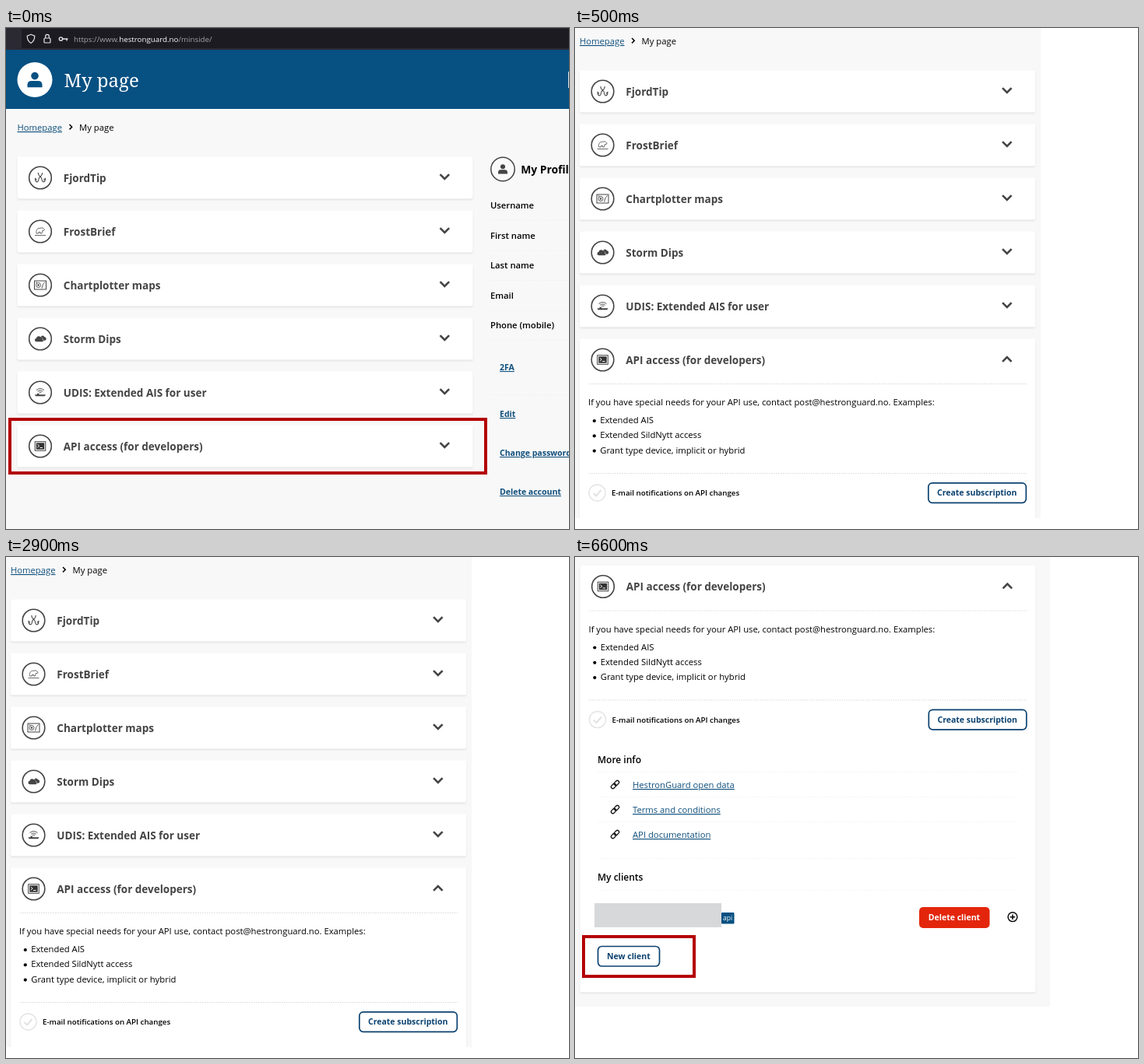
Recreate the animation shown at these times as an HTML page. Size 723 by 644 pixels, loop 8000 ms.

```html
<!DOCTYPE html>
<html lang="en">
<head>
<meta charset="utf-8">
<title>My page</title>
<style>
html, body { margin: 0; width: 100%; height: 100%; overflow: hidden; background: #fff; }
svg { display: block; width: 723px; height: 644px; font-family: "Open Sans", sans-serif; }
text { white-space: pre; }
</style>
</head>
<body>
<svg id="stage" viewBox="0 0 723 644"></svg>
<script>
const LOOP = 8000;
const INK = '#000', GREY = '#444', BLUE = '#075082', NAVY = '#0b4270', RED = '#b30306';

const text = (x, y, s, size = 11.25, weight = 400, fill = INK, more = '') =>
  `<text x="${x}" y="${y}" font-size="${size}" font-weight="${weight}" fill="${fill}" ${more}>${s}</text>`;
const link = (x, y, s, size, weight) => text(x, y, s, size, weight, '#0f4f7c', 'text-decoration="underline"');
const rect = (x, y, w, h, fill, more = '') =>
  `<rect x="${x}" y="${y}" width="${w}" height="${h}" fill="${fill}" ${more}/>`;
const circle = (x, y, r, fill, more = '') => `<circle cx="${x}" cy="${y}" r="${r}" fill="${fill}" ${more}/>`;
const line = (d, stroke = GREY, width = 1, more = '') =>
  `<path d="${d}" fill="none" stroke="${stroke}" stroke-width="${width}" ${more}/>`;
const shape = (d, fill = GREY) => `<path d="${d}" fill="${fill}"/>`;
const move = (x, y, s, k = 1) => `<g transform="translate(${x} ${y}) scale(${k})">${s}</g>`;
const dots = (x1, x2, y, c = '#d9d9d9') => line(`M${x1} ${y}H${x2}`, c, 1, 'stroke-dasharray="1.6 1.4"');
const frame = (x, y, w, h) => rect(x, y, w, h, 'none', `stroke="${RED}" stroke-width="4"`);
const outlined = (x, y, w, h, tx, s) =>
  rect(x, y, w, h, '#fff', `rx="5" stroke="${NAVY}" stroke-width="1.7"`) + text(tx, y + h / 2 + 3.8, s, 10.5, 700, NAVY);

const icons = {
  hooks: line('M-2.8-6.5Q-2.5-3.2 0-1.2 2-.2 2.2 3C2.8 6.6 6.6 6.2 6.4 1L4.4 2.8' +
    'M2.8-6.5Q2.5-3.2 0-1.2-2-.2-2.2 3C-2.8 6.6-6.6 6.2-6.4 1L-4.4 2.8', GREY, 1.1),
  bear: line('M-5 2.5C-5.5-1-4-4.5-1-4.2L3-4.6 5.8-2.2 4.5-1 2.8-1 2 2.5H0V.8H-2V2.5ZM-7 5H7', GREY, .8),
  map: rect(-7.5, -5.5, 15, 11, 'none', `stroke="${GREY}" stroke-width="1"`) +
    circle(-2.5, 0, 3, 'none', `stroke="${GREY}" stroke-width=".9"`) + circle(-2.5, 0, 1.2, GREY) +
    line('M2 4L3.5-1 6-4M-6-3.5h2', GREY, .9),
  clouds: move(0, 0, shape('M-6 4.5A2.8 2.8 0 0 1-5.8-1 3.6 3.6 0 0 1 .3-2.8 2.8 2.8 0 0 1 3 .8 2 2 0 0 1 3.5 4.5Z') +
    shape('M1-3.2A3 3 0 0 1 6.3-2.6 2.6 2.6 0 0 1 6.4 2.6H4.7A3.2 3.2 0 0 0 3.2-.3 3.8 3.8 0 0 0 1-3.2Z'), .86),
  ship: line('M-5-3Q0-7 5-3M-3.3-1.3Q0-4 3.3-1.3M-1.5.2Q0-1 1.5.2', GREY, .9) +
    shape('M-7 2.8H-4V1.2H-1.5V2.8H7L5.8 4.8H-6Z'),
  terminal: rect(-6.8, -5.8, 13.6, 11.6, '#fff', `stroke="${GREY}" stroke-width="1"`) +
    rect(-5.2, -4.2, 10.4, 8.4, '#333') + line('M-3.6-2.3L-1.3-.3-3.6 1.7M-.4 2H3', '#fff', 1)
};

const sections = [
  ['hooks', 'FjordTip'], ['bear', 'FrostBrief'], ['map', 'Chartplotter maps'],
  ['clouds', 'Storm Dips'], ['ship', 'UDIS: Extended AIS for user'], ['terminal', 'API access (for developers)']
];

function card(i, height = 54, open = false) {
  const [icon, name] = sections[i], y = 54.5 + i * 69;
  return rect(6, y + 1.5, 585, height, '#e2e2e2', 'rx="2" filter="url(#soft)"') +
    rect(6, y, 585, height, '#fff', 'rx="2"') +
    circle(35.5, y + 27, 14.3, '#fff', `stroke="${GREY}" stroke-width="1.6"`) +
    move(35.5, y + 27, icons[icon]) +
    text(65.3, y + 32.4, name, 13.5, 700, GREY) +
    line(open ? `M549 ${y + 29.3}l5.8-5.8 5.8 5.8` : `M549 ${y + 22.7}l5.8 5.8 5.8-5.8`, GREY, 2.6);
}
const cards = n => sections.slice(0, n).map((_, i) => card(i)).join('');

const crumbs = link(6, 21, 'Homepage') + line('M73 13l3.2 3.2-3.2 3.2', INK, 1.5) + text(85.6, 21, 'My page');

const apiPanel = height => card(5, height, true) + dots(18, 580, 457.5) +
  text(17, 485, 'If you have special needs for your API use, contact post@hestronguard.no. Examples:') +
  ['Extended AIS', 'Extended SildNytt access', 'Grant type device, implicit or hybrid'].map((s, i) =>
    circle(24.8, 505 + i * 19.3, 2.1, INK) + text(32.2, 508 + i * 19.3, s)).join('') +
  dots(18, 580, 572.5) +
  circle(28.5, 597.5, 10.5, '#fff', 'stroke="#e4e4e4" stroke-width="1.4"') +
  line('M23.5 598l3.5 3.5 6.5-7.5', '#e2e2e2', 2) +
  text(47, 601, 'E-mail notifications on API changes', 9.75, 600) +
  outlined(453.8, 584.8, 125.5, 25.5, 465, 'Create subscription');

const person = (x, y, k, fill) => move(x, y,
  circle(0, -5.2, 4.8, fill) + shape('M-9.5 9.5V6.5Q-9.5 1.2-4.2 1.2H4.2Q9.5 1.2 9.5 6.5V9.5Z', fill), k);

function browserBar() {
  const c = '#e8e8ec';
  return rect(0, 0, 723, 28, '#2b2a33') + rect(20, 1, 703, 25, '#1c1b22') +
    line('M32 8.3l4.8 1.8c0 5-1.5 7.6-4.8 9.4-3.3-1.8-4.8-4.4-4.8-9.4Z', c, 1.2) +
    rect(49, 13, 8, 6, 'none', `rx="1" stroke="${c}" stroke-width="1.2"`) +
    line('M50.7 13v-2.3a2.3 2.3 0 0 1 4.6 0V13', c, 1.2) +
    circle(70.5, 14, 2.2, 'none', `stroke="${c}" stroke-width="1.3"`) + line('M72.7 14H79.5M78 14v2.4', c, 1.3) +
    text(87, 17.7, 'https://www.<tspan fill="#fbfbfe">hestronguard.no</tspan>/minside/', 9.75, 400, '#a3a2aa');
}

function profile() {
  const labels = ['Username', 'First name', 'Last name', 'Email', 'Phone (mobile)'];
  const links = [['2FA', 440], ['Edit', 500], ['Change password', 550], ['Delete account', 600]];
  return circle(638, 181.5, 15.2, '#fafafa', `stroke="${GREY}" stroke-width="1.5"`) +
    person(638, 181.5, .63, GREY) + text(661.3, 187, 'My Profile', 13.8, 700) +
    labels.map((s, i) => text(622, 232.3 + i * 38.5, s, 11.25, 600) +
      dots(622, 723, 247.5 + i * 38.5, '#f1f1f1')).join('') +
    dots(622, 723, 471.5, '#f1f1f1') +
    links.map(([s, y]) => link(634, y, s, 10.5, 700)).join('');
}

const overview = () => rect(0, 0, 723, 644, '#f8f8f8') + browserBar() +
  rect(0, 28, 723, 76, BLUE) + circle(37, 66.5, 22.5, '#fff') + person(37, 66.8, 1, BLUE) +
  text(74.5, 75.5, 'My page', 24, 500, '#fff', 'font-family="Noto Serif, serif"') +
  rect(722, 56, 1, 21, '#dfe8ef') +
  move(8.5, 111, crumbs + cards(6)) + profile() + frame(5, 503, 611, 69);

const expanded = () => rect(0, 0, 598, 630, '#f8f8f8') + crumbs + cards(5) +
  `<g clip-path="url(#fold)">${apiPanel(260)}</g>`;

function clients() {
  const links = ['HestronGuard open data', 'Terms and conditions', 'API documentation'];
  const ring = x => rect(x, -2.2, 7, 4.4, 'none', 'rx="2.2" stroke="#111" stroke-width="1.3"');
  const chain = `<g transform="rotate(-45)">${ring(-6.3)}${ring(-.7)}</g>`;
  return rect(0, 0, 610, 578, '#f8f8f8') + move(.5, -388.5, apiPanel(548.5)) +
    text(29, 265, 'More info', 12, 600) + text(29, 416, 'My clients', 12, 600) +
    [276.5, 308.5, 340.5, 387.5, 428.5].map(y => dots(29, 569, y, '#f3f3f3')).join('') +
    links.map((s, i) => move(51.5, 292.5 + i * 32, chain) + link(74, 297 + i * 32, s)).join('') +
    rect(25, 445, 163, 31, '#d7d8d9') + rect(188, 457, 16.5, 14.5, BLUE, 'rx="1"') +
    text(190, 467.3, 'api', 8.5, 400, '#fff') +
    rect(442, 450, 90.5, 27, '#e3260b', 'rx="5"') +
    text(487, 467.3, 'Delete client', 10.5, 700, '#fff', 'text-anchor="middle"') +
    circle(562, 462.7, 5.9, 'none', 'stroke="#111" stroke-width="1.5"') +
    line('M558.8 462.7h6.4M562 459.5v6.4', INK, 1.5) +
    outlined(29.5, 500.5, 79, 25.5, 41, 'New client') + frame(11, 488, 142, 51);
}

const scenes = [[0, overview], [500, expanded], [4500, clients]];
const stage = document.getElementById('stage');
stage.innerHTML = '<defs><filter id="soft"><feGaussianBlur stdDeviation="1"/></filter>' +
  '<clipPath id="fold"><rect width="598" height="630"/></clipPath></defs>' +
  scenes.map(([, draw]) => `<g class="scene">${draw()}</g>`).join('');
const layers = [...stage.querySelectorAll('.scene')];

function render(ms) {
  const t = ms % LOOP;
  const current = scenes.filter(([start]) => t >= start).length - 1;
  layers.forEach((g, i) => g.setAttribute('display', i === current ? 'inline' : 'none'));
}

const begin = performance.now();
function tick() {
  render(performance.now() - begin);
  requestAnimationFrame(tick);
}
render(0);
requestAnimationFrame(tick);
</script>
</body>
</html>
```
